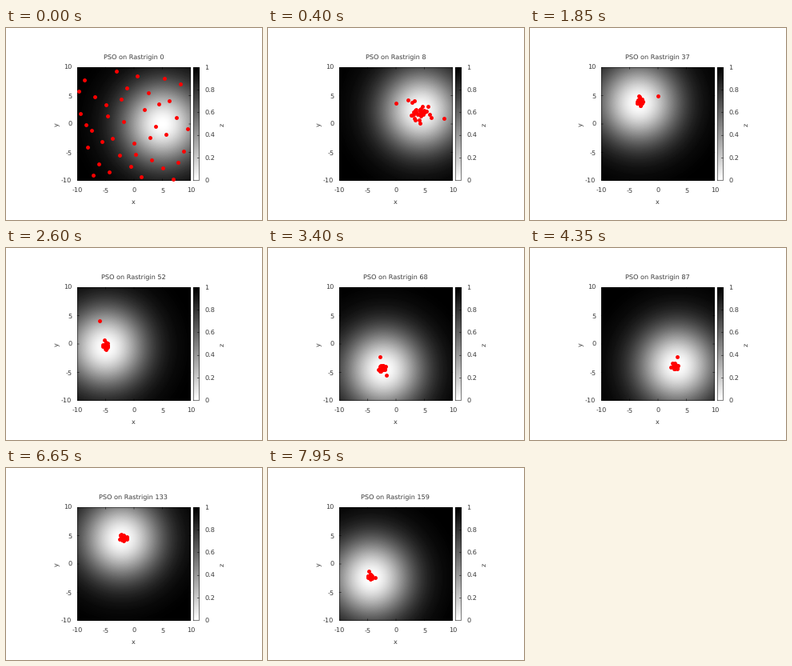
Recreate the animation shown at these times as a matplotlib script. Size 320x240 px, loop 8000 ms.

```python
import numpy as np
import matplotlib.pyplot as plt
from matplotlib.animation import FuncAnimation

FRAMES, INTERVAL = 160, 50
W, H, DPI = 320, 240, 80
PX = 72 / DPI                                  # points per pixel
LEFT, RIGHT, TOP, BOTTOM = 89, 231, 49, 191
BAR_L, BAR_R = 234, 241.5
MID_X, MID_Y = (LEFT + RIGHT) / 2, (TOP + BOTTOM) / 2
UNIT = (RIGHT - LEFT) / 20
INK = "#3a3a3a"

plt.rcParams.update({"font.family": "DejaVu Sans", "text.hinting": "none"})


def centre(n):
    """Optimum of the moving function at step n."""
    return 5 * np.array([np.cos(n / 16), np.sin(n / 16)])


def halton(i, base):
    value, f = 0.0, 1.0
    while i:
        f /= base
        value += f * (i % base)
        i //= base
    return value


def fly(count=40):
    """Positions of the swarm at every step."""
    rng = np.random.default_rng(7)
    pos = np.array([[20 * halton(i, b) - 10 for b in (2, 3)]
                    for i in range(1, count + 1)])
    vel = np.zeros_like(pos)
    inertia = 0.6 + 0.27 * rng.random((count, 1)) ** 3   # few slow settlers
    path = [pos]
    for n in range(1, FRAMES):
        pull = 1.4 * rng.random(pos.shape) * (centre(n - 1.5) - pos)
        kick = rng.normal(0, 0.1, pos.shape)
        vel = np.clip(inertia * vel + pull + kick, -3.5, 3.5)
        pos = pos + vel
        path.append(pos)
    return path


def to_px(p):
    return MID_X + p[:, 0] * UNIT, MID_Y - p[:, 1] * UNIT


def field(n):
    cx, cy = centre(n)
    return 1 - np.exp(-((GX - cx) ** 2 + (GY - cy) ** 2) / 50)


def label(x, y, s, ha="center", **kw):
    return ax.text(x, y, s, ha=ha, size=8.1 * PX, color=INK,
                   **{"va": "baseline", **kw})


def line(xs, ys):
    ax.plot(xs, ys, color="black", lw=0.5 * PX, snap=False, zorder=3)


def box(x0, x1):
    x0, x1, y0, y1 = x0 + 0.25, x1 - 0.25, TOP + 0.25, BOTTOM - 0.25
    line([x0, x1, x1, x0, x0], [y0, y0, y1, y1, y0])


fig = plt.figure(figsize=(W / DPI, H / DPI), dpi=DPI, facecolor="white")
ax = fig.add_axes([0, 0, 1, 1])
ax.axis("off")

cells = 142
side = (np.arange(cells) + 0.5) / cells * 20 - 10
GX, GY = np.meshgrid(side, -side)
look = dict(cmap="gray_r", vmin=0, vmax=1, aspect="auto", zorder=1)
heat = ax.imshow(field(0), extent=(LEFT, RIGHT, BOTTOM, TOP), **look)
ax.imshow(np.linspace(1, 0, 128)[:, None],
          extent=(BAR_L, BAR_R, BOTTOM, TOP), **look)
box(LEFT, RIGHT)
box(BAR_L, BAR_R)

TICK = 2.3
for v in range(-10, 11, 5):
    x, y = MID_X + v * UNIT, MID_Y - v * UNIT
    label(x, 206, str(v))
    label(82.3, y + 3.1, str(v), ha="right")
    if abs(v) < 10:
        for edge, d in ((BOTTOM, -TICK), (TOP, TICK)):
            line([x, x], [edge, edge + d])
        for edge, d in ((LEFT, TICK), (RIGHT, -TICK)):
            line([edge, edge + d], [y, y])

for k in range(6):
    y = BOTTOM - k * (BOTTOM - TOP) / 5
    label(248.6, y + 3.1, f"{k / 5:g}", ha="left")
    if 0 < k < 5:
        line([BAR_R - TICK, BAR_R], [y, y])

label(MID_X - 0.6, 219.6, "x")
label(64, MID_Y + 0.7, "y", rotation=90, va="center")
label(270.3, MID_Y + 0.7, "z", rotation=90, va="center")
title = label(MID_X - 0.6, 38.2, "")

path = fly()
dots, = ax.plot(*to_px(path[0]), "o", color="red", ms=4.9 * PX, mew=0,
                zorder=4)
ax.set_xlim(0, W)
ax.set_ylim(H, 0)


def update(n):
    heat.set_data(field(n))
    dots.set_data(*to_px(path[n]))
    title.set_text(f"PSO on Rastrigin {n}")
    return heat, dots, title


anim = FuncAnimation(fig, update, frames=FRAMES, interval=INTERVAL,
                     repeat=True, repeat_delay=0)
plt.show()
```
